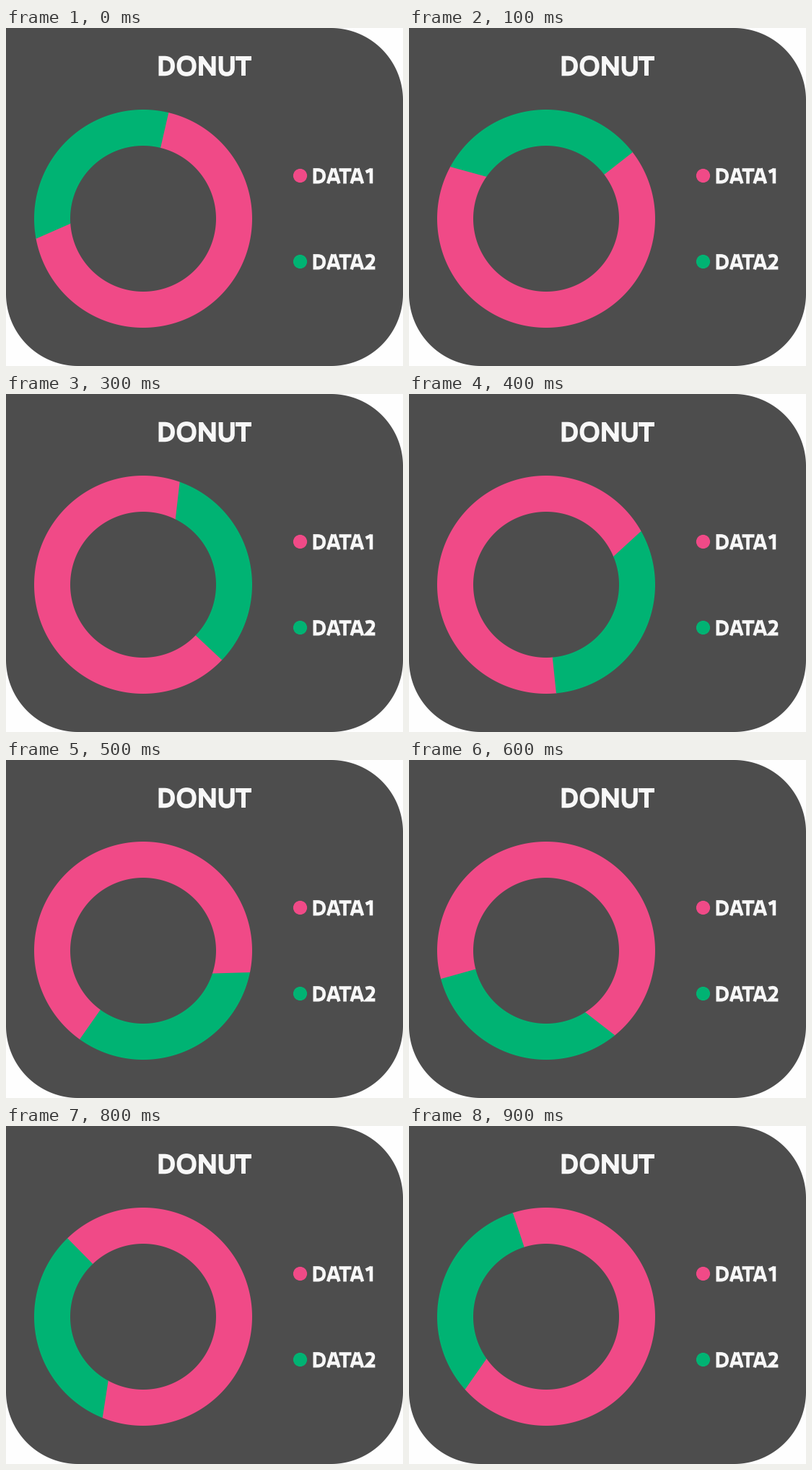
Recreate the animation shown at these times as a matplotlib script. Size 550 by 468 pixels, loop 1000 ms.

```python
import numpy as np
import matplotlib.pyplot as plt
from matplotlib.animation import FuncAnimation
from matplotlib.patches import Circle, PathPatch, Polygon
from matplotlib.path import Path

W, H, DPI = 550, 468, 100
GRAY, PINK, GREEN, WHITE = "#4d4d4d", "#f04a87", "#00b373", "#f7f7f7"
CENTER, OUTER, INNER = (190, 264), 151, 101

# Rotation in degrees, clockwise from the top, of the green part's leading edge.
TURN = [13.5, 52.5, 93.2, 133.7, 174.7, 215.6, 255, 288.1, 316, 342.2]
SPAN = 114.1
LEAD_SKEW, TAIL_SKEW = 0.3, 6.7

# Letter centre lines on a cap height of 1: advance, then path commands.
STROKE = .22
GLYPHS = {
    "D": (.87, "M .11 .1 L .11 .9 L .28 .9 C .58 .9 .72 .76 .72 .5 "
               "C .72 .24 .58 .1 .28 .1 Z"),
    "O": (1.19, "M .56 .92 C .82 .92 .95 .76 .95 .5 C .95 .24 .82 .08 .56 .08 "
                "C .3 .08 .17 .24 .17 .5 C .17 .76 .3 .92 .56 .92 Z"),
    "N": (1.02, "M .11 0 L .11 1 M .13 .92 L .74 .08 M .76 0 L .76 1"),
    "U": (.95, "M .11 1 L .11 .4 C .11 .19 .21 .08 .41 .08 "
               "C .61 .08 .71 .19 .71 .4 L .71 1"),
    "T": (.67, "M -.08 .9 L .74 .9 M .33 0 L .33 .9"),
    "A": (.88, "M .11 0 L .42 1 M .84 0 L .53 1 M .2 .28 L .75 .28"),
    "1": (.8, "M .53 0 L .53 1 M .5 .9 L .18 .75"),
    "2": (.9, "M .17 .85 C .4 .95 .67 .94 .67 .7 "
              "C .67 .5 .46 .33 .25 .1 L .79 .1"),
}
CODES = {"M": [Path.MOVETO], "L": [Path.LINETO],
         "C": [Path.CURVE4] * 3, "Z": [Path.CLOSEPOLY]}

fig = plt.figure(figsize=(W / DPI, H / DPI), dpi=DPI, facecolor="#fefefe")
ax = fig.add_axes([0, 0, 1, 1])
ax.set(xlim=(0, W), ylim=(H, 0))
ax.axis("off")


def arc(center, radius, start, end):
    angle = np.radians(np.linspace(start, end, 181))
    return np.column_stack([center[0] + radius * np.sin(angle),
                            center[1] - radius * np.cos(angle)])


def ring_part(tail, lead, tail_skew, lead_skew):
    return np.vstack([arc(CENTER, OUTER, tail, lead),
                      arc(CENTER, INNER, lead + lead_skew, tail + tail_skew)])


def glyph_path(outline, x, baseline, cap):
    verts, codes = [], []
    tokens = iter(outline.split())
    for command in tokens:
        for code in CODES[command]:
            codes.append(code)
            if command == "Z":
                verts.append((0, 0))
            else:
                u, v = float(next(tokens)), float(next(tokens))
                verts.append((x + u * cap, baseline - v * cap))
    return Path(verts, codes)


def write(text, x, baseline, cap):
    for char in text:
        advance, outline = GLYPHS[char]
        ax.add_patch(PathPatch(glyph_path(outline, x, baseline, cap),
                               fill=False, edgecolor=WHITE,
                               linewidth=STROKE * cap * 72 / DPI,
                               capstyle="butt", joinstyle="miter"))
        x += advance * cap


card = np.vstack([[(0, 0)], arc((450, 100), 100, 0, 90),
                  arc((450, 368), 100, 90, 180),
                  arc((100, 368), 100, 180, 270)])
ax.add_patch(Polygon(card, color=GRAY, linewidth=0))
write("DONUT", 211.5, 66, 27)
for label, color, y in (("DATA1", PINK, 204.5), ("DATA2", GREEN, 323.5)):
    ax.add_patch(Circle((407.5, y), 9.6, color=color, linewidth=0))
    write(label, 425.5, y + 10.8, 21)

pink = ax.add_patch(Polygon([(0, 0)], color=PINK, linewidth=0))
green = ax.add_patch(Polygon([(0, 0)], color=GREEN, linewidth=0))


def update(frame):
    lead = TURN[frame]
    tail = lead - SPAN
    # The pink part reaches slightly under the green one to hide the seam.
    pink.set_xy(ring_part(lead - .4, tail + 360.4, LEAD_SKEW, TAIL_SKEW))
    green.set_xy(ring_part(tail, lead, TAIL_SKEW, LEAD_SKEW))
    return pink, green


anim = FuncAnimation(fig, update, frames=len(TURN), interval=100, repeat=True)
plt.show()
```
